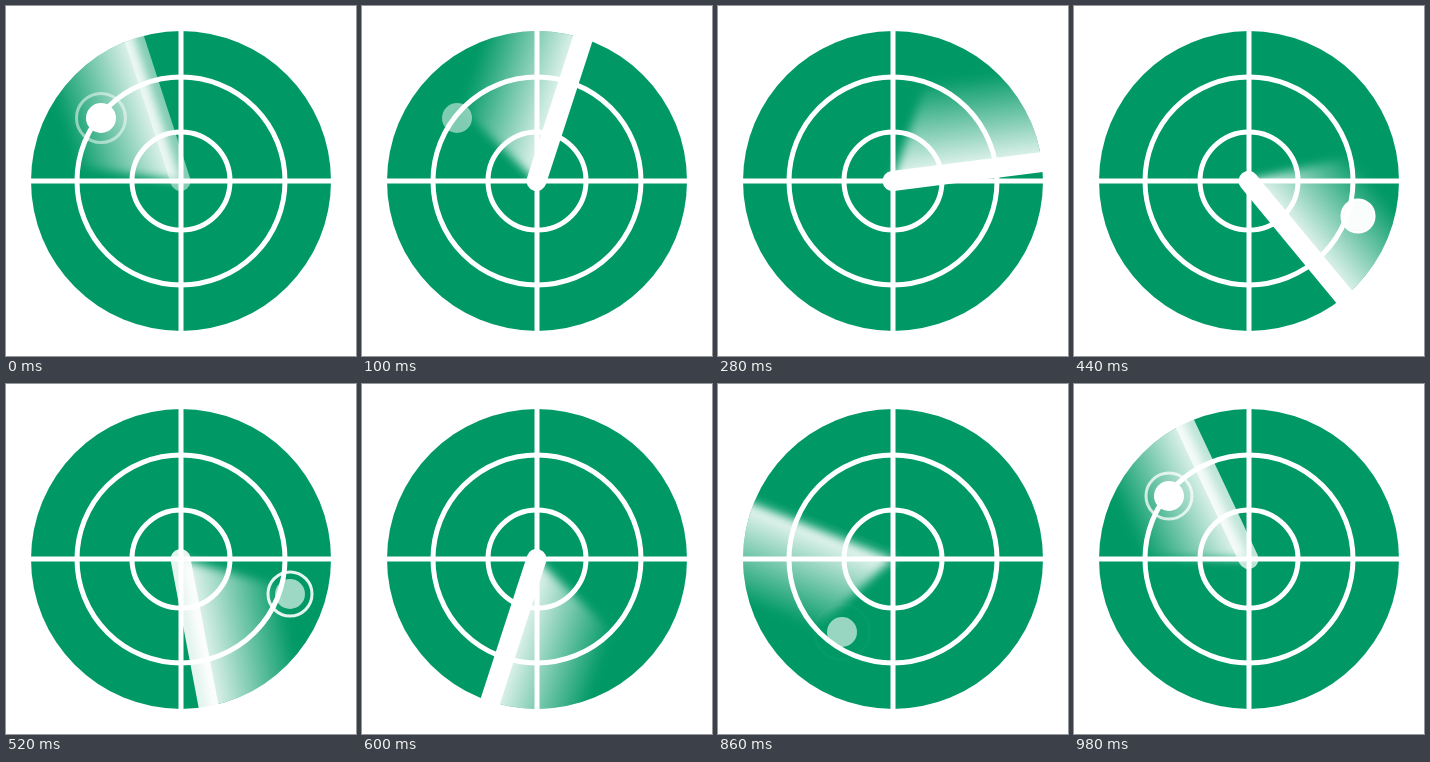
An HTML page with a canvas for the animation above (1000 ms loop, 350 by 350 pixels).

```html
<!DOCTYPE html>
<html lang="en">
<head>
<meta charset="utf-8">
<title>Radar</title>
<style>
  html, body { margin: 0; width: 100%; height: 100%; overflow: hidden; background: #fff; }
  canvas { display: block; width: 350px; height: 350px; }
</style>
</head>
<body>
<canvas id="radar" width="350" height="350"></canvas>
<script>
const ctx = document.getElementById('radar').getContext('2d');
const LOOP = 1000, STEP = 20;
const C = 175, R = 150;
const HUB_X = 174.5;
const TAIL = 95, SPREAD = 64 * Math.PI / 180;
const RING_TIME = 170;

// ring: start of the pulse; on/off: [start, end] of the dot's fades
const blips = [
  { x: 95,  y: 112, ring: 873, on: [870, 930], off: [1000, 1200] },
  { x: 284, y: 210, ring: 426, on: [350, 443], off: [470, 600] },
  { x: 124, y: 248, ring: 692, on: [655, 770], off: [800, 950] }
];

const ramp = (t, [a, b]) => Math.min(1, Math.max(0, (t - a) / (b - a)));
const white = a => `rgba(255,255,255,${a})`;

function circle(x, y, r) {
  ctx.beginPath();
  ctx.arc(x, y, r, 0, Math.PI * 2);
}

function line(x1, y1, x2, y2) {
  ctx.beginPath();
  ctx.moveTo(x1, y1);
  ctx.lineTo(x2, y2);
  ctx.stroke();
}

function drawTail(angle) {
  ctx.save();
  circle(C, C, R);
  ctx.clip();
  ctx.translate(HUB_X, C);
  ctx.rotate(angle);
  const g = ctx.createLinearGradient(0, 0, -TAIL, 0);
  g.addColorStop(0, white(0.95));
  g.addColorStop(1, white(0));
  ctx.fillStyle = g;
  ctx.filter = 'blur(5px)';
  ctx.beginPath();
  ctx.moveTo(0, 0);
  ctx.lineTo(0, -200);
  ctx.lineTo(-200, -200);
  ctx.lineTo(-200, -200 / Math.tan(SPREAD));
  ctx.fill();
  ctx.restore();
}

function drawGrid() {
  ctx.strokeStyle = '#fff';
  ctx.lineWidth = 5;
  line(C - R, C, C + R, C);
  line(C, C - R, C, C + R);
  for (const r of [49, 104]) {
    circle(C, C, r);
    ctx.stroke();
  }
}

function drawHand(angle) {
  ctx.save();
  ctx.translate(HUB_X, C);
  ctx.rotate(angle);
  ctx.lineWidth = 20;
  ctx.lineCap = 'round';
  line(0, 0, 0, -160);
  ctx.restore();
}

function drawBlip(b, now) {
  const t = now < b.on[0] ? now + LOOP : now;
  const alpha = ramp(t, b.on) * (1 - ramp(t, b.off));
  if (alpha > 0) {
    ctx.fillStyle = white(alpha);
    circle(b.x, b.y, 15);
    ctx.fill();
  }
  const p = (t - b.ring) / RING_TIME;
  if (p >= 0 && p < 1) {
    ctx.strokeStyle = white(Math.min(1, 2 * (1 - p)));
    ctx.lineWidth = 3;
    circle(b.x, b.y, 15 + 12.7 * p);
    ctx.stroke();
  }
}

function draw() {
  const t = Math.floor(performance.now() % LOOP / STEP) * STEP;
  const angle = (t / LOOP - 0.05) * Math.PI * 2;
  ctx.fillStyle = '#fff';
  ctx.fillRect(0, 0, 350, 350);
  ctx.fillStyle = '#009966';
  circle(C, C, R);
  ctx.fill();
  drawTail(angle);
  drawGrid();
  for (const b of blips) drawBlip(b, t);
  drawHand(angle);
  requestAnimationFrame(draw);
}

draw();
</script>
</body>
</html>
```
